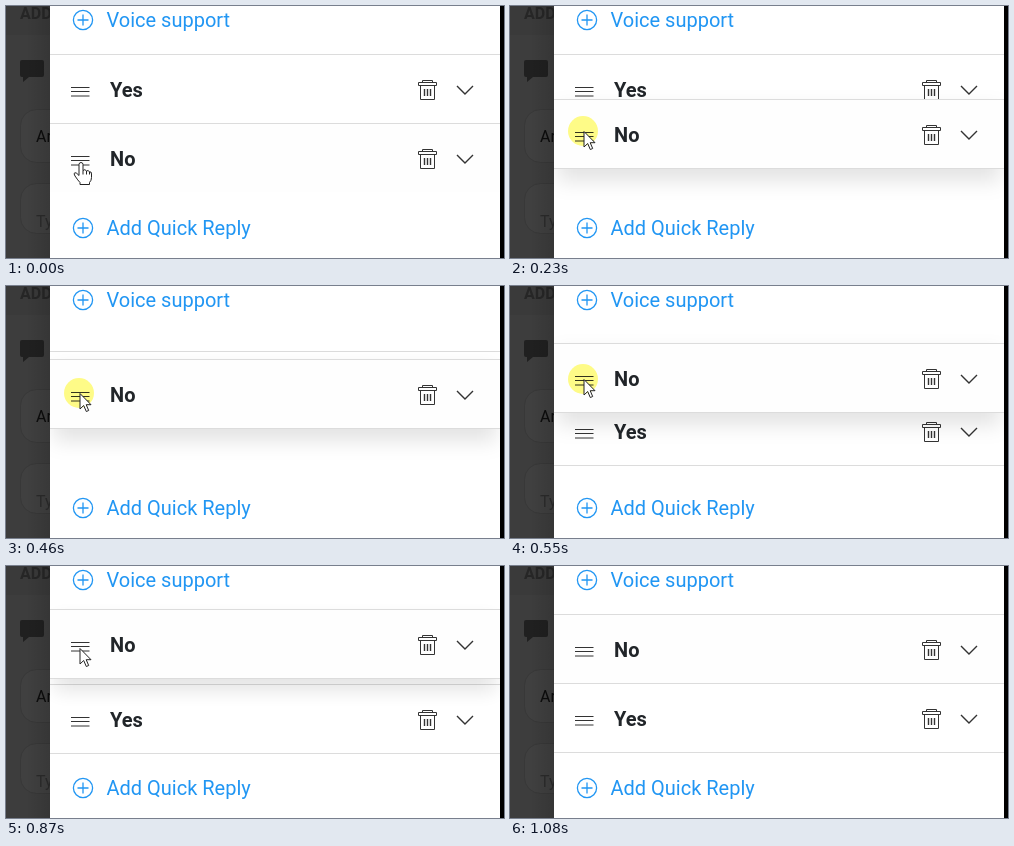
An HTML page for the animation above (1.31 s loop, 498x252 px).

```html
<!DOCTYPE html>
<html lang="en">
<head>
<meta charset="utf-8">
<title>Reorder quick replies</title>
<style>
  html, body { margin: 0; width: 100%; height: 100%; overflow: hidden; background: #3d3d3d; }
  svg { display: block; width: 498px; height: 252px; font: 20px Roboto, sans-serif; }
  .line { stroke: #dcdcdc; }
  .icon { fill: none; stroke: #333; }
  .label { font-weight: 700; fill: #212529; }
  .link { fill: #2196f3; }
  .link g { fill: none; stroke: #2196f3; stroke-width: 1.3; }
  .page { font-size: 16px; }
  #shadow { filter: blur(10px); }
  #glow { fill: #fffc88; mix-blend-mode: multiply; }
  #cursor path { fill: #fff; stroke: #222; stroke-linejoin: round; }
</style>
</head>
<body>
<svg viewBox="0 0 498 252">
  <defs>
    <linearGradient id="edge">
      <stop offset="0" stop-opacity="0"/>
      <stop offset="1" stop-opacity=".12"/>
    </linearGradient>
    <clipPath id="panel"><path d="M44 0H494V252H44Z"/></clipPath>
    <!-- Row contents, with the label's middle at y = 0 -->
    <g id="tools" class="icon">
      <path d="M65-2.5H83.5M65 1.5H83.5M65 6H83.5"/>
      <path d="M412.5-7.5H430.5V-4.5H412.5ZM416.5-7.5V-9.5H426.5V-7.5M414.5-4.5V9.5H428.5V-4.5"/>
      <path d="M418.5-1V6M421.5-1V6M424.5-1V6" stroke-width="1.4"/>
      <path d="M451-4L459 4L467-4" stroke-width="1.4"/>
    </g>
    <g id="plus">
      <circle cx="77" r="9.6"/>
      <path d="M71.5 0H82.5M77-5.5V5.5"/>
    </g>
  </defs>

  <g class="page">
    <rect width="498" height="252" fill="#3d3d3d"/>
    <rect width="498" height="29" fill="#3a3a3a"/>
    <text x="14" y="13" font-weight="700" fill="#262626">ADD</text>
    <path d="M16 54H36Q38 54 38 56V69Q38 71 36 71H23L17 76V71H16Q14 71 14 69V56Q14 54 16 54Z" fill="#202020"/>
    <g fill="#404040" stroke="#383838">
      <rect x="14.5" y="103.5" width="80" height="53" rx="16"/>
      <rect x="14.5" y="177.5" width="80" height="50" rx="16"/>
    </g>
    <text x="30" y="136" fill="#0c0c0c">Ar</text>
    <text x="30" y="221" fill="#2b2b2b">Ty</text>
    <rect x="20" width="24" height="252" fill="url(#edge)"/>
    <rect x="494" width="4" height="252"/>
  </g>

  <g clip-path="url(#panel)">
    <rect x="44" width="450" height="252" fill="#fff"/>
    <g class="link">
      <g transform="translate(0 14)"><use href="#plus"/></g>
      <text x="100.5" y="21">Voice support</text>
      <g transform="translate(0 222)"><use href="#plus"/></g>
      <text x="100.5" y="229">Add Quick Reply</text>
    </g>
    <g id="yes">
      <path class="line" d="M44-35.5H494M44 33.5H494"/>
      <use href="#tools"/>
      <text class="label" x="104" y="7">Yes</text>
    </g>
    <g id="no">
      <rect id="shadow" x="48" y="-26" width="442" height="72" fill-opacity=".11"/>
      <rect x="44" y="-36" width="450" height="69" fill="#fefefe"/>
      <path class="line" d="M44-35.5H494"/>
      <path id="base" class="line" d="M44 33.5H494"/>
      <use href="#tools"/>
      <text class="label" x="104" y="7">No</text>
    </g>
    <g id="cursor">
      <circle id="glow" cx="73" r="15"/>
      <g transform="translate(74 .5)">
        <path id="arrow" d="M0 0V15.5L3.7 12L6.3 18L8.7 17L6.2 11.2H11Z"/>
        <path id="hand" d="M-1 2Q-1 0 1 0T3 2V8Q5 6 6.5 8.5Q8.5 7 9.5 9.5Q11.5 8.5 11.5 11.5V15Q11.5 18 9.5 20V22H0V20Q-2 18-5 13.5Q-7 10.5-5 10.2Q-3.5 10-1 13ZM3 8V12M6.5 8.5V12M9.5 9.5V12"/>
      </g>
    </g>
  </g>
</svg>
<script>
  const LOOP = 1310, STEP = 77;
  const GRAB = 70, SWAP = 340, RELEASE = 840, REST = 1000;

  const el = id => document.getElementById(id);
  const show = (id, on) => el(id).style.display = on ? "" : "none";
  const moveTo = (id, y) => el(id).setAttribute("transform", `translate(0 ${Math.round(y)})`);
  const ramp = (t, from, to) => Math.min(1, Math.max(0, (t - from) / (to - from)));
  const easeOut = (t, from, to) => Math.sin(ramp(t, from, to) * Math.PI / 2);

  function draw(time) {
    // The picture advances in even steps, then rests
    const t = Math.min(Math.floor(time / STEP), 14) * STEP;
    const settle = ramp(t, RELEASE, REST);
    const lift = ramp(t, 0, 2 * GRAB) - settle;
    const hand = t % (4 * STEP) === 0 && t < SWAP;

    moveTo("no", 153 - 74 * easeOut(t, GRAB, RELEASE) + 5 * settle);
    moveTo("yes", 84 + 70 * easeOut(t, SWAP, SWAP + 290) - settle);
    moveTo("cursor", 156 - 74 * easeOut(t, 0, RELEASE));
    el("shadow").style.opacity = el("base").style.opacity = lift;
    show("hand", hand);
    show("arrow", !hand);
    show("glow", t >= GRAB && t < RELEASE);
    show("cursor", t < REST);
  }

  const start = performance.now();
  function frame() {
    draw((performance.now() - start) % LOOP);
    requestAnimationFrame(frame);
  }
  frame();
</script>
</body>
</html>
```
